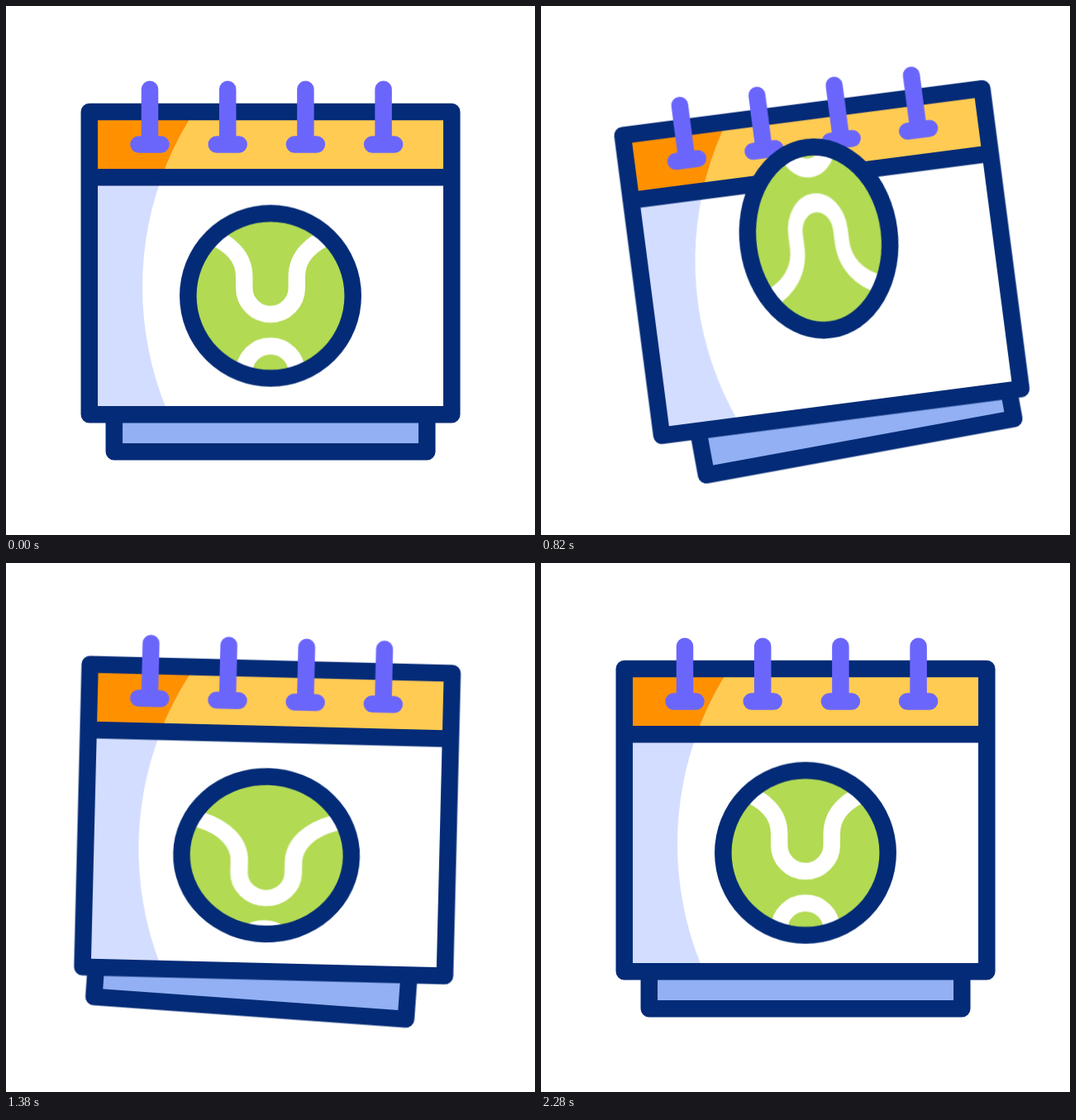
An HTML page for the animation above (2800 ms loop, 640 px wide and 640 px high).

```html
<!DOCTYPE html>
<html lang="en">
<head>
<meta charset="utf-8">
<title>Match calendar</title>
<style>
  html, body { margin: 0; width: 100%; height: 100%; overflow: hidden; background: #fff; }
  svg { display: block; width: 640px; height: 640px; }

  .line { fill: none; stroke: #042b77; stroke-width: 20.5; stroke-linejoin: round; }
  .pin { fill: none; stroke: #6b66fb; stroke-width: 20.5; stroke-linecap: round; }
  .seam { fill: none; stroke: #fff; stroke-width: 20.5; }

  #calendar, #base, #ball, #seams {
    animation: 2800ms cubic-bezier(.333, 0, .667, 1) infinite;
  }
  #calendar { transform-origin: 320px 158px; animation-name: swing; }
  #base { transform-origin: 320px 207px; animation-name: trail; }
  #ball { transform-origin: 0 0; animation-name: bounce; }
  #seams { transform-origin: 0 0; animation-name: roll; }

  @keyframes swing {
    0%, 6.43% { transform: rotate(0deg); }
    18.57% { transform: rotate(8deg); }
    30.71% { transform: rotate(-8deg); }
    42.86% { transform: rotate(8deg); }
    55% { transform: rotate(-4deg); }
    67.14% { transform: rotate(4deg); }
    79.29%, 100% { transform: rotate(0deg); }
  }
  /* the base follows the calendar 60 ms late */
  @keyframes trail {
    0%, 8.57% { transform: rotate(0deg); }
    20.71% { transform: rotate(5deg); }
    32.86% { transform: rotate(-5deg); }
    45% { transform: rotate(5deg); }
    57.14% { transform: rotate(-3deg); }
    69.29% { transform: rotate(3deg); }
    81.43%, 100% { transform: rotate(0deg); }
  }
  @keyframes bounce {
    0%, 6.43% { transform: translate(320px, 350.6px) scale(1, 1); }
    12.5% { transform: translate(320px, 364.2px) scale(1.049, .935); }
    30.71% { transform: translate(320px, 281px) scale(.856, 1.118); }
    52.86% { transform: translate(320px, 359px) scale(1.043, .943); }
    65%, 100% { transform: translate(320px, 350.6px) scale(1, 1); }
  }
  @keyframes roll {
    0%, 6.43% { transform: translateY(0); }
    12.5% { transform: translateY(48px); }
    24.64% { transform: translateY(-112px); }
    50.71% { transform: translateY(33px); }
    61.43% { transform: translateY(-8px); }
    73.57%, 100% { transform: translateY(0); }
  }
</style>
</head>
<body>
<svg viewBox="0 0 640 640">
  <defs>
    <clipPath id="page"><rect x="101" y="128" width="438" height="366"/></clipPath>
    <clipPath id="disc"><circle r="99.7"/></clipPath>
    <path id="pin" class="pin" d="M0 100.7V167.5M-13.5 167.5H13.5"/>
    <path id="seam" class="seam" d="M-110 -74Q-90 -69 -78 -65C-50 -56 -31.8 -38 -31.8 -14V0A31.8 31.8 0 0 0 31.8 0V-14C31.8 -38 50 -56 78 -65Q90 -69 110 -74"/>
  </defs>

  <g id="calendar">
    <g id="base">
      <rect class="line" x="130.8" y="450" width="378.5" height="89.3" style="fill:#92b0f3"/>
    </g>

    <g clip-path="url(#page)">
      <rect x="101" y="128" width="438" height="366" fill="#d3ddff"/>
      <rect x="101" y="128" width="438" height="79" fill="#ff9100"/>
      <circle cx="553" cy="340" r="388" fill="#fff"/>
    </g>
    <clipPath id="header"><rect x="101" y="128" width="438" height="79"/></clipPath>
    <g clip-path="url(#header)">
      <circle cx="553" cy="340" r="388" fill="#ffcb52"/>
    </g>
    <path class="line" d="M100.8 128H539.3V494.3H100.8ZM100.8 207.2H539.3"/>

    <use href="#pin" x="174"/>
    <use href="#pin" x="268.2"/>
    <use href="#pin" x="362.4"/>
    <use href="#pin" x="456.6"/>

    <g id="ball">
      <g clip-path="url(#disc)">
        <circle r="99.7" fill="#b2da53"/>
        <g id="seams">
          <use href="#seam" transform="translate(0 -9.5)"/>
          <use href="#seam" transform="translate(0 92.5) scale(1 -1)"/>
        </g>
      </g>
      <circle class="line" r="99.7" vector-effect="non-scaling-stroke"/>
    </g>
  </g>
</svg>
</body>
</html>
```
